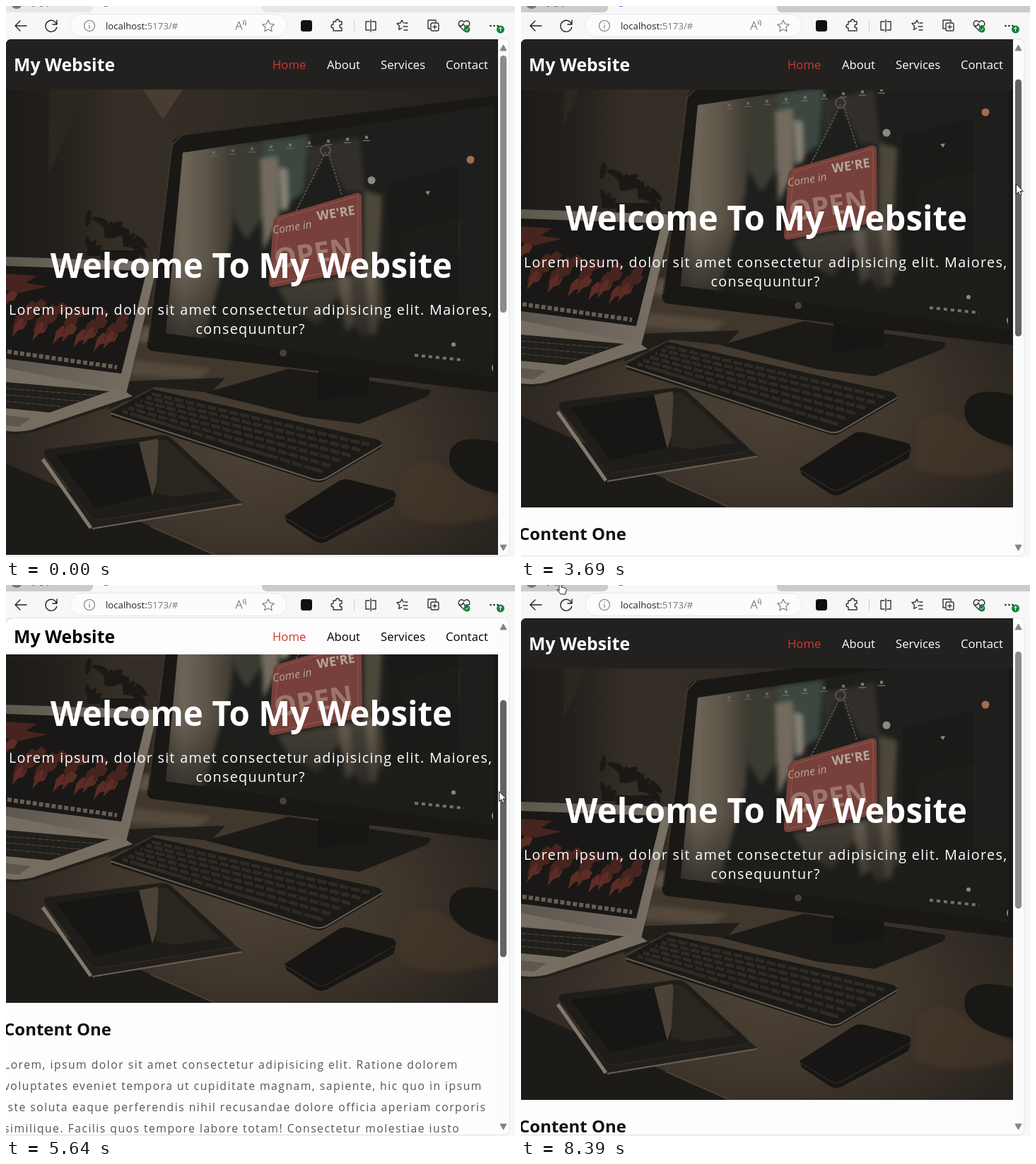
These frames come from a looping animation (720x778 px, 8.61 s). An HTML page:

```html
<!DOCTYPE html>
<html lang="en">
<head>
<meta charset="utf-8">
<title>My Website</title>
<style>
  html, body { margin: 0; width: 100%; height: 100%; overflow: hidden; background: #f7f7f7; }
  svg { display: block; }
  text { font-family: "Open Sans", "Noto Sans", sans-serif; white-space: pre; }
  .bold { font-weight: 700; }
  .icon { fill: none; stroke: #333; stroke-width: 1.4; stroke-linecap: round; stroke-linejoin: round; }
  .lead { font-size: 19.8px; letter-spacing: 1.3px; fill: #fff; }
  .copy { font-size: 15.7px; letter-spacing: 1.49px; fill: #555; }
  .link { font-size: 16.7px; }
</style>
</head>
<body>
<svg width="720" height="778" viewBox="0 0 720 778">
  <defs>
    <clipPath id="view"><path d="M0 776V55Q0 47 8 47H696V776Z"/></clipPath>
    <clipPath id="photo"><rect y="47" width="696" height="728"/></clipPath>
    <clipPath id="panel"><path d="M250 207L690 140V524L226 462Z"/></clipPath>
    <clipPath id="screen"><path d="M0 367L199 374 163 519 0 498Z"/></clipPath>
    <linearGradient id="wall">
      <stop offset="0" stop-color="#1d1b18"/><stop offset=".12" stop-color="#25211c"/>
      <stop offset=".22" stop-color="#352e26"/><stop offset=".36" stop-color="#332d25"/>
      <stop offset=".6" stop-color="#2b2721"/><stop offset="1" stop-color="#24211d"/>
    </linearGradient>
    <radialGradient id="desk" gradientUnits="userSpaceOnUse" cx="350" cy="625" r="400" gradientTransform="matrix(1 0 0 .6 0 250)">
      <stop offset="0" stop-color="#4c4135"/><stop offset=".5" stop-color="#3f362c"/><stop offset="1" stop-color="#27231e"/>
    </radialGradient>
    <linearGradient id="curtain">
      <stop offset="0" stop-color="#494238"/><stop offset=".3" stop-color="#6e6558"/>
      <stop offset=".6" stop-color="#5c5448"/><stop offset="1" stop-color="#37342c"/>
    </linearGradient>
    <linearGradient id="fade" x2="0" y2="1">
      <stop offset="0" stop-color="#1c1d1a" stop-opacity="0"/><stop offset="1" stop-color="#1c1b18"/>
    </linearGradient>
    <linearGradient id="silver">
      <stop offset="0" stop-color="#5e574e"/><stop offset="1" stop-color="#7a7166"/>
    </linearGradient>
    <filter id="soft"><feGaussianBlur stdDeviation="3"/></filter>
  </defs>

  <rect width="720" height="778" fill="#f7f7f7"/>

  <!-- tab strip -->
  <g id="tabs">
    <path d="M0 0H123V3Q122 9 115 9H0Z"/>
    <path d="M362 0H720V9H369Q362 8 362 3Z"/>
  </g>
  <circle cx="15" cy="-4" r="8" fill="#777"/>
  <path d="M37 0h3m8 0h4m6 0h2" stroke="#555" stroke-width="1.4"/>
  <path d="M139 0h5" stroke="#9253d8" stroke-width="2"/>

  <!-- toolbar -->
  <rect x="91" y="11.5" width="306" height="32" rx="16" fill="#fcfcfc" stroke="#e8e6e8"/>
  <g class="icon">
    <path d="M29 28H13m7-7l-7 7 7 7" stroke="#222"/>
    <path d="M71.5 25.5a8 8 0 1 0 .3 4.6M72 20v6h-6" stroke="#222"/>
    <g stroke="#777" stroke-width="1.1">
      <circle cx="118" cy="28" r="7.5"/><path d="M118 27v4.500M118 24.300v.2"/>
      <path d="M325 33l4.500-11 4.500 11m-7.500-4h6M335 21q2 2.500 1 5M337.500 19.500q3 4 1 8"/>
      <path d="M371 20l2.500 5.300 5.800.7-4.300 4 1.100 5.800-5.100-2.900-5.100 2.900 1.100-5.800-4.300-4 5.800-.7Z"/>
    </g>
    <path d="M463 22h3.500q0-3 2.500-3t2.500 3H475v4q-3 0-3 2.500t3 2.500v4H463v-4q-3 0-3-2.500t3-2.500Z"/>
    <path d="M492.500 20v15" stroke="#ccc" stroke-width="1"/>
    <path d="M514 22h-5v12h5M518 22h5v12h-5M516 19.500v17"/>
    <path d="M562 24l-2-4-2 4-5 .8 3.500 3.500-.8 5 4-2M564 24h4M562 29h6M563 34h5"/>
    <path d="M600 32h-3V20h11v3"/><rect x="601" y="24" width="11" height="11" rx="2"/><path d="M606.500 27v5m-2.500-2.500h5"/>
    <path d="M648 35l-7-7q-2-4 1-6.500 4-2 6 1.500 2-3.500 6-1.500 3 2.500 1 6.500M641 28h4l2-3 2.500 5 1.500-2h4"/>
  </g>
  <text x="141" y="32.500" font-size="13.200" fill="#222">localhost:<tspan fill="#777">5173/#</tspan></text>
  <rect x="417" y="20" width="16" height="16" rx="3.500" fill="#111"/>
  <circle cx="652" cy="33" r="4.500" fill="#16803c"/>
  <path d="M650 33l1.500 1.500 2.800-3" fill="none" stroke="#fff"/>
  <g fill="#222"><circle cx="685.500" cy="28" r="1.300"/><circle cx="690.500" cy="28" r="1.300"/><circle cx="695.500" cy="28" r="1.300"/></g>
  <circle cx="699.500" cy="33" r="5.500" fill="#16803c"/>
  <path d="M699.500 36v-6m-2.300 2.300l2.300-2.300 2.300 2.300" fill="none" stroke="#fff"/>

  <path d="M0 46.500H703Q712 46.500 712 55V768Q712 776.500 703 776.500H0" fill="#fcfcfc" stroke="#e4e4e4"/>

  <g clip-path="url(#view)">
    <rect y="47" width="696" height="729" fill="#fdfdfd"/>
    <g id="page">
      <g clip-path="url(#photo)">
        <rect y="47" width="696" height="728" fill="url(#wall)"/>
        <path d="M194 118h56l-28 42Z" fill="#473d31"/>
        <path d="M62 118h52l-54 120Z" fill="#2b2620"/>
        <rect y="485" width="696" height="290" fill="url(#desk)"/>
        <path d="M190 450L300 462 460 490V540L290 548 165 535Z" fill="#40372d"/>
        <path d="M196 452L330 470 300 482 186 474Z" fill="#5d5246" filter="url(#soft)"/>
        <path d="M182 500L290 512 270 528 172 520Z" fill="#554a3e" filter="url(#soft)"/>
        <path d="M160 530L310 525 290 546 210 538 145 570Z" fill="#211e1a"/>
        <path d="M0 646L205 735 295 775H0Z" fill="#1d1b18"/>
        <path d="M205 735L295 775" stroke="#4a4035" stroke-width="2"/>
        <path d="M560 655Q600 630 632 660L696 694V720Q600 745 555 715Z" fill="#46392c" opacity=".6" filter="url(#soft)"/>
        <g id="plant" fill="#1b1916"></g>

        <!-- monitor -->
        <path d="M282 546L400 512 600 542Q602 550 590 554L500 590 420 580Z" fill="#1b1a17"/>
        <path d="M443 500L515 508 512 550 440 556Z" fill="#171614"/>
        <path d="M235 195Q238 185 248 183L696 126V546L206 487Q198 484 200 474Z" fill="#191815"/>
        <path d="M248 183L235 196 201 474" fill="none" stroke="#3c352c" stroke-width="2"/>
        <g clip-path="url(#panel)">
          <rect x="200" y="130" width="496" height="400" fill="#1e1f1c"/>
          <g filter="url(#soft)">
            <path d="M235 190H330L318 330 280 470H215Z" fill="url(#curtain)"/>
            <path d="M326 192H362L368 290 340 330 322 300Z" fill="#3b3a32"/>
            <path d="M362 190L428 182 422 262 384 290 366 250Z" fill="#3a4740"/>
            <path d="M360 216L384 212 386 300 364 345Z" fill="#736b5e"/>
            <path d="M386 228l12 3 2 54-10 6Z" fill="#858074"/>
            <path d="M428 200L500 185 508 262 480 262 452 205 428 255Z" fill="#302f2a"/>
            <path d="M506 260L532 268 528 350 506 390Z" fill="#4d463b"/>
            <path d="M384 398L530 372 536 440 505 470 470 410 440 450 400 425Z" fill="#4a4237"/>
            <path d="M470 385l16-3 6 70-12 8ZM508 375l14-4 4 90-12 4Z" fill="#6a6053"/>
            <path d="M560 320L640 300V350L560 372Z" fill="#2c2a25"/>
          </g>
          <path d="M540 250L640 225V430L540 440Z" fill="#191a17" opacity=".8"/>
          <rect x="200" y="370" width="496" height="150" fill="url(#fade)"/>
        </g>
        <g fill="#91887d">
          <circle cx="517" cy="246" r="5.500"/><circle cx="657" cy="217" r="5.500" fill="#a56a53"/>
          <path d="M593 262l7-1-3 6ZM689 506q-4 5 0 10v-10Z"/>
          <circle cx="633" cy="478" r="3"/>
        </g>
        <g id="shortcuts" fill="#918a7f"></g>
        <path d="M578 493L648 500" stroke="#77716a" stroke-width="4" stroke-dasharray="5 5"/>
        <path d="M452 206L408 294M456 206L475 267" stroke="#57524a" stroke-width="2" stroke-dasharray="3 2"/>
        <circle cx="452" cy="204" r="7" fill="none" stroke="#57524a" stroke-width="2"/>
        <path d="M384 297L496 264Q503 263 503 270L504 365Q504 371 498 373L378 397Q371 397 372 390L378 304Q379 299 384 297Z" fill="#78403a"/>
        <path d="M386 301L498 268V367L377 392Z" fill="none" stroke="#8f5a50"/>
        <g transform="rotate(-9)" font-weight="700">
          <text x="388" y="368" font-size="18" fill="#b3a89d">WE'RE</text>
          <text x="323" y="377" font-size="15.500" font-style="italic" font-weight="400" fill="#b3a89d">Come in</text>
          <text x="319" y="427" font-size="40" fill="#9c766c">OPEN</text>
        </g>
        <circle cx="392" cy="490" r="5" fill="#46413a"/>

        <!-- laptop -->
        <path d="M0 354L205 361Q214 362 213 370L170 547 0 514Z" fill="url(#silver)"/>
        <path d="M0 367L199 374 163 519 0 498Z" fill="#191816"/>
        <g id="ridge" clip-path="url(#screen)"></g>
        <path d="M2 488L157 510" stroke="#655e55" stroke-width="6" stroke-dasharray="6 3"/>
        <path d="M0 511L170 545 182 553 38 602Q20 607 0 603Z" fill="#766d61"/>
        <path d="M0 602Q20 605 38 600L182 552" fill="none" stroke="#23201c" stroke-width="4"/>
        <path d="M0 531L146 544 62 574 0 568Z" fill="#211f1b"/>
        <path d="M0 540L128 550M0 549L104 558M0 558L82 566" stroke="#514a41" stroke-dasharray="7 2"/>
        <path d="M0 578l36 4-18 12-18-2Z" fill="#5f574e"/>

        <!-- keyboard -->
        <path d="M148 573L207 541 525 612Q535 616 531 624L452 670Q444 675 434 671L150 580Z" fill="#1b1a17"/>
        <path d="M148 575L434 668Q444 671 452 667L532 620" fill="none" stroke="#655c51" stroke-width="2"/>
        <g id="keys" fill="none" stroke="#2f2a24" stroke-width="5"></g>

        <!-- tablet, phone, mouse -->
        <path d="M52 645L120 739 336 703 322 692 125 728Z" fill="#23201c"/>
        <path d="M52 640L120 737" stroke="#82786c" stroke-width="5"/>
        <path d="M122 738L334 703" stroke="#686055" stroke-width="2"/>
        <path d="M60 625L216 606Q228 605 235 611L320 689Q326 694 316 697L132 726Q124 727 118 720L54 634Q50 627 60 625Z" fill="#1f1d19" stroke="#332d26"/>
        <path d="M70 634L190 617 208 690 127 709Z" fill="#171614"/>
        <path d="M188 616L214 611 224 640 207 692Z" fill="#4b4136"/>
        <path d="M216 612L228 613 304 684 238 693 212 688Z" fill="#29251f"/>
        <path d="M394 720L470 671Q477 667 486 669L546 684Q553 687 551 695L548 706 452 757Q443 760 436 755L397 729Z" fill="#171614"/>
        <path d="M394 722L440 750Q446 753 454 749L551 694" fill="none" stroke="#2b2721" stroke-width="1.500"/>
        <path d="M696 616Q652 606 636 618 622 630 630 652 644 678 696 688Z" fill="#191815"/>
      </g>
      <text class="bold" x="347" y="384" font-size="47.500" fill="#fff" text-anchor="middle">Welcome To My Website</text>
      <text class="lead" x="4" y="436">Lorem ipsum, dolor sit amet consectetur adipisicing elit. Maiores,</text>
      <text class="lead" x="268.500" y="462.500">consequuntur?</text>
      <text class="bold" x="-3" y="820.500" font-size="24" fill="#111">Content One</text>
      <g class="copy">
        <text x="-3" y="867.500">Lorem, ipsum dolor sit amet consectetur adipisicing elit. Ratione dolorem</text>
        <text x="-3" y="897.500">voluptates eveniet tempora ut cupiditate magnam, sapiente, hic quo in ipsum</text>
        <text x="-3" y="927.500">iste soluta eaque perferendis nihil recusandae dolore officia aperiam corporis</text>
        <text x="-3" y="957.500">similique. Facilis quos tempore labore totam! Consectetur molestiae iusto</text>
      </g>
    </g>
    <rect id="bar" y="47" width="696" height="71"/>
    <g id="menu">
      <text class="bold" x="11" y="9" font-size="24.800">My Website</text>
      <g class="link">
        <text x="377" y="6" fill="#cc382f">Home</text>
        <text x="454" y="6">About</text>
        <text x="530" y="6">Services</text>
        <text x="622" y="6">Contact</text>
      </g>
    </g>
  </g>

  <path d="M699 63l4.500-8 4.500 8ZM699 761l4.500 8 4.500-8Z" fill="#858585" stroke="#858585" stroke-linejoin="round"/>
  <rect id="thumb" x="699" y="70" width="9" height="363" rx="4.500"/>

  <g id="cursor" fill="#fff" stroke="#222" stroke-linejoin="round">
    <path id="arrow" d="M0 0V14l3.200-3 2.200 5 2.300-1-2.200-4.800H10Z"/>
    <path id="hand" d="M-2 9V-4q1.500-2 3 0V3l6 1.500q1.500.5 1 3L7 13H0L-5 7q0-2 3 0"/>
  </g>
</svg>
<script>
const $ = id => document.getElementById(id);
const LOOP = 8610;

const ticks = [0, 80, 300, 520, 750, 970, 1190, 1420, 1650, 1880, 2110, 2340, 2560, 2780, 3000,
  3220, 3460, 3680, 3900, 4120, 4340, 4560, 4780, 5000, 5200, 5640, 5860, 6060, 6280, 6500,
  6700, 6920, 7110, 7530, 7750, 7970, 8180, 8390];

// [time, value, ...]
const scrollKeys = [[3000, 0], [3220, 8], [3460, 34], [4120, 133], [4340, 160], [4780, 194],
  [5200, 200], [5640, 185], [6060, 135], [6500, 88], [6920, 51], [7110, 48]];
const cursorKeys = [[80, 56, 2], [970, 330, 330], [2110, 560, 400], [2780, 701, 214], [3000, 701, 209],
  [4120, 700, 279], [4780, 698, 306], [5200, 698, 309], [6060, 697, 275], [6920, 698, 234],
  [7110, 698, 233], [7530, 660, 215], [8180, 90, 30], [8390, 56, 0]];
const stickyKeys = [[4400, 0], [4700, 1], [5910, 1], [6210, 0]];

function sample(keys, t) {
  const next = keys.findIndex(k => k[0] > t);
  if (next === 0) return keys[0].slice(1);
  if (next < 0) return keys.at(-1).slice(1);
  const a = keys[next - 1], b = keys[next], p = (t - a[0]) / (b[0] - a[0]);
  return a.slice(1).map((v, i) => v + (b[i + 1] - v) * p);
}

function add(parent, tag, attrs) {
  const node = document.createElementNS(parent.namespaceURI, tag);
  for (const name in attrs) node.setAttribute(name, attrs[name]);
  parent.append(node);
}

function buildPhotoDetails() {
  for (let i = 0; i < 22; i++) {
    const x = 116 + (i * 37) % 78, y = 300 + (i * 23) % 50;
    add($('plant'), 'ellipse', { cx: x, cy: y, rx: 12, ry: 4, transform: `rotate(${(i * 67) % 160 - 80} ${x} ${y})` });
  }
  add($('plant'), 'path', { d: 'M130 345h62l-8 20h-46Z' });
  for (let i = 0; i < 26; i++) {
    const x = (i * 43) % 158, y = 408 + x * .14 + (i * 29) % 44;
    add($('ridge'), 'path', {
      d: `M${x} ${y}l9 -8 8 6 -5 9 -8 2 -9 10Z`, fill: i % 3 ? '#48241e' : '#5c2c25'
    });
  }
  add($('ridge'), 'path', { d: 'M0 378L44 381 28 391 58 396 20 405 0 401Z', fill: '#48241e' });
  for (let i = 0; i < 9; i++) {
    const x = 294 + i * 27, y = 205 - i * 2.7;
    add($('shortcuts'), 'rect', { x: x - 2, y, width: 4, height: 4, opacity: .4 + i * .06 });
    add($('shortcuts'), 'rect', { x: x - 5, y: y + 6, width: 10, height: 1.5, opacity: .3 + i * .05 });
  }
  for (let row = 0; row < 6; row++) {
    const p = (row + .6) / 6.4;
    add($('keys'), 'path', {
      d: `M${212 - 54 * p} ${545 + 31 * p}L${522 - 84 * p} ${615 + 49 * p}`,
      'stroke-dasharray': row === 5 ? '15 3 15 3 90 3' : '13 3', 'stroke-dashoffset': row * 5
    });
  }
}

function render(now) {
  const time = now % LOOP;
  const t = ticks.findLast(tick => tick <= time);
  const [scroll] = sample(scrollKeys, t);
  const [sticky] = sample(stickyKeys, t);
  const [x, y] = sample(cursorKeys, t);
  const light = t >= 4400 && t < 5910;
  const height = 71 - 20 * sticky;
  const shade = Math.round(255 * (1 - sticky));

  $('page').setAttribute('transform', `translate(0 ${-scroll})`);
  $('bar').setAttribute('height', height);
  $('bar').setAttribute('fill', light ? '#fdfdfd' : '#232120');
  $('menu').setAttribute('transform', `translate(0 ${47 + height / 2})`);
  $('menu').setAttribute('fill', `rgb(${shade},${shade},${shade})`);
  $('thumb').setAttribute('y', 70 + scroll / 2);
  $('thumb').setAttribute('fill', t >= 2780 && t < 7530 ? '#636363' : '#8b8b8b');
  $('tabs').setAttribute('fill', t < 3460 ? '#e7e7e7' : '#cbcbcb');
  const overTab = y < 10;
  $('cursor').setAttribute('transform', `translate(${x} ${y})`);
  $('cursor').setAttribute('visibility', t < 80 ? 'hidden' : 'visible');
  $('arrow').setAttribute('display', overTab ? 'none' : 'inline');
  $('hand').setAttribute('display', overTab ? 'inline' : 'none');
}

buildPhotoDetails();
const start = performance.now();
function loop() {
  render(performance.now() - start);
  requestAnimationFrame(loop);
}
loop();
</script>
</body>
</html>
```
